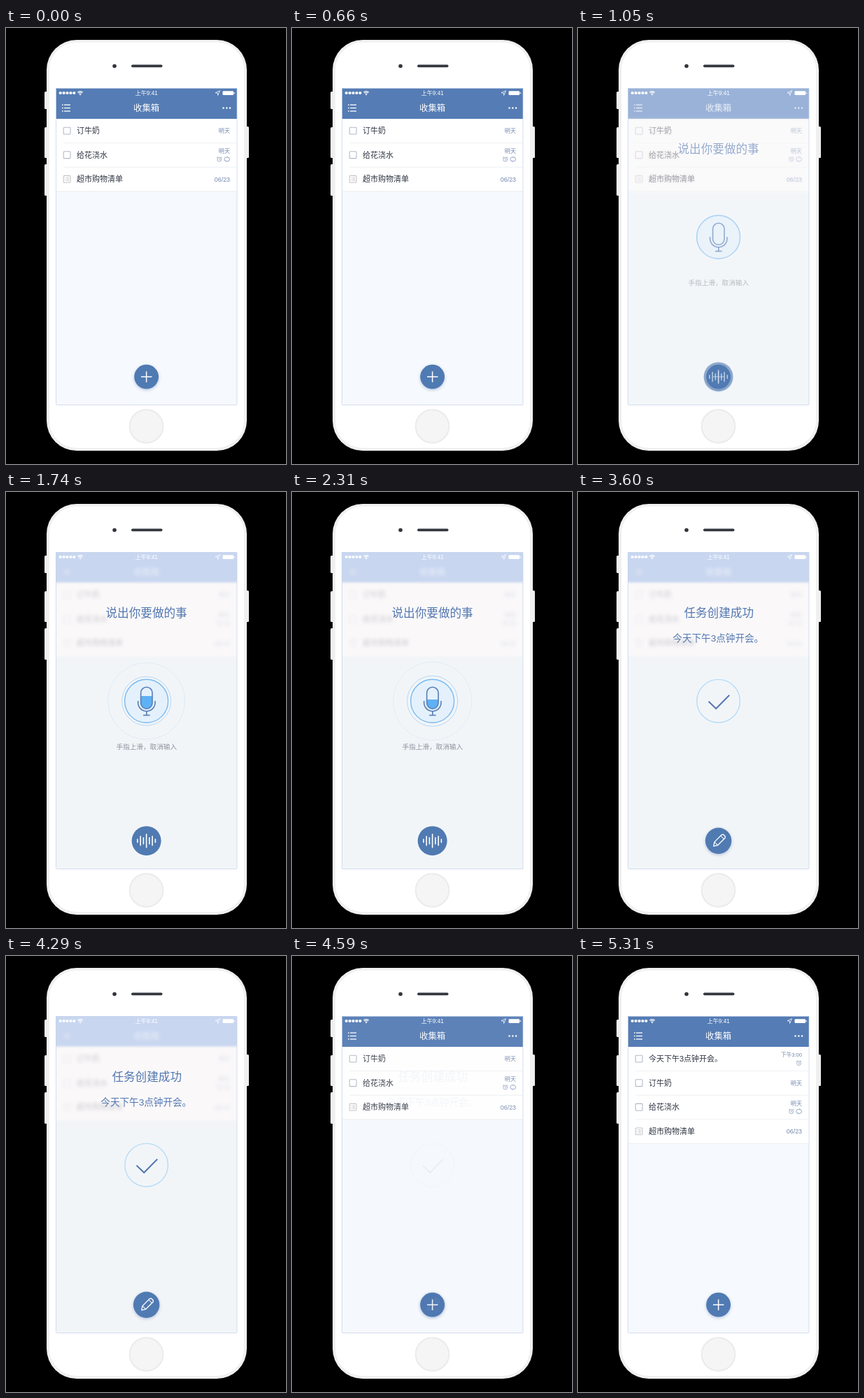
Animation of 400 by 624 pixels, one loop 5340 ms. Source, as an HTML page with a canvas:

```html
<!DOCTYPE html>
<html lang="zh-CN">
<head>
<meta charset="utf-8">
<title>语音任务</title>
<style>
html, body { margin: 0; width: 100%; height: 100%; overflow: hidden; background: #000; }
canvas { display: block; width: 400px; height: 624px; }
</style>
</head>
<body>
<canvas id="stage"></canvas>
<script>
const W = 400, H = 624, LOOP = 5340, STEP = 30, ROW = 34.6;
const FONT = '"Liberation Sans", "Noto Sans CJK SC", "Noto Sans CJK", sans-serif';
const BLUE = '#557cb4', INK = '#2f3442', DATE = '#7187ae', CX = 200.6;
const dpr = window.devicePixelRatio || 1;

function setup(canvas) {
  canvas.width = W * dpr;
  canvas.height = H * dpr;
  const c = canvas.getContext('2d');
  c.scale(dpr, dpr);
  return c;
}
const main = setup(document.getElementById('stage'));
let g = main;

const clamp = v => Math.max(0, Math.min(1, v));
const ramp = (t, a, b) => clamp((t - a) / (b - a));
const easeOut = p => 1 - Math.pow(1 - p, 3);
const mix = (a, b, p) => a + (b - a) * p;

function group(alpha, draw) {
  if (alpha <= 0) return;
  g.save();
  g.globalAlpha *= alpha;
  draw();
  g.restore();
}
function box(x, y, w, h, r, fill, stroke, lw = 1) {
  g.beginPath();
  g.roundRect(x, y, w, h, r);
  if (fill) { g.fillStyle = fill; g.fill(); }
  if (stroke) { g.strokeStyle = stroke; g.lineWidth = lw; g.stroke(); }
}
function disc(x, y, r, fill, stroke, lw = 1) {
  g.beginPath();
  g.arc(x, y, r, 0, Math.PI * 2);
  if (fill) { g.fillStyle = fill; g.fill(); }
  if (stroke) { g.strokeStyle = stroke; g.lineWidth = lw; g.stroke(); }
}
function line(points, color, lw) {
  g.beginPath();
  points.forEach(([x, y]) => g.lineTo(x, y));
  g.strokeStyle = color;
  g.lineWidth = lw;
  g.stroke();
}
function arc(x, y, r, a, b, color, lw) {
  g.beginPath();
  g.arc(x, y, r, a, b);
  g.strokeStyle = color;
  g.lineWidth = lw;
  g.stroke();
}
// y is the vertical middle of the line
function text(s, x, y, size, color, align = 'left', weight = 400) {
  g.font = `${weight} ${size}px ${FONT}`;
  g.textAlign = align;
  g.fillStyle = color;
  g.fillText(s, x, y + size * 0.37);
}

function phone() {
  g.fillStyle = '#000';
  g.fillRect(0, 0, W, H);
  [[91, 25], [142, 44], [195, 45]].forEach(([y, h]) => box(55, y, 6, h, 1.5, '#eee'));
  box(341, 141, 6, 45, 1.5, '#eee');
  box(58, 17, 286, 588, 43, '#f0f0f0');
  box(62, 20.5, 278, 580.5, 39, '#fff');
  disc(155, 54.5, 2.8, '#34363f');
  box(179, 52.6, 44.5, 3.6, 1.8, '#34363f');
  disc(200.5, 570, 23.8, '#f5f5f5', '#ebebeb', 2);
}

function status() {
  for (let i = 0; i < 5; i++) disc(77.7 + i * 4.9, 93, 2.1, '#fff');
  [1.8, 3.6, 5.4].forEach(r => arc(106, 96, r, -Math.PI * 0.75, -Math.PI * 0.25, '#fff', 1.1));
  disc(106, 95.6, 0.8, '#fff');
  text('上午9:41', CX, 93, 8.2, '#fff', 'center', 500);
  g.beginPath();
  [[305.5, 89.7], [299, 92.8], [302.3, 93.2], [302.6, 96.4]].forEach(p => g.lineTo(...p));
  g.closePath();
  g.strokeStyle = '#fff';
  g.lineWidth = 0.8;
  g.stroke();
  box(309.5, 90.2, 15.6, 5.8, 1.2, '#fff');
  box(325.6, 92, 1.2, 2.2, 0.5, '#fff');
}

function nav() {
  [110, 114.5, 119].forEach(y => {
    line([[80, y], [81.6, y]], '#fff', 1.3);
    line([[83, y], [92, y]], '#fff', 1.3);
  });
  text('收集箱', CX, 114.5, 12.4, '#fff', 'center');
  [310.5, 315.3, 320].forEach(x => disc(x, 114.6, 1.25, '#fff'));
}

function alarm(x, y) {
  disc(x, y + 0.3, 2.9, null, '#8b9cbd', 0.8);
  line([[x, y - 1.5], [x, y + 0.6], [x + 1.5, y + 0.6]], '#8b9cbd', 0.7);
  line([[x - 3.6, y - 2], [x - 2, y - 3.4]], '#8b9cbd', 0.9);
  line([[x + 3.6, y - 2], [x + 2, y - 3.4]], '#8b9cbd', 0.9);
}
function repeatIcon(x, y) {
  arc(x - 0.8, y, 3, Math.PI * 0.5, Math.PI * 1.6, '#8b9cbd', 0.9);
  arc(x + 0.8, y, 3, -Math.PI * 0.5, Math.PI * 0.6, '#8b9cbd', 0.9);
  line([[x - 1.2, y + 1.6], [x + 0.2, y + 3], [x - 1.2, y + 4.2]], '#8b9cbd', 0.7);
  line([[x + 1.2, y - 1.6], [x - 0.2, y - 3], [x + 1.2, y - 4.2]], '#8b9cbd', 0.7);
}

const MEETING = '今天下午3点钟开会。';
const FRESH = { title: MEETING, date: '下午3:00', size: 7.6, alarm: 315.5 };
const TASKS = [
  { title: '订牛奶', date: '明天', size: 8.1 },
  { title: '给花浇水', date: '明天', size: 8.1, alarm: 304.7, repeat: 315.7 },
  { title: '超市购物清单', date: '06/23', size: 8.9, list: true }
];

function task(item, y) {
  box(82.2, y - 5, 9.8, 9.8, 1, null, item.list ? '#c5c5ca' : '#b4b8c8', 1.1);
  if (item.list) [-2.2, 0, 2.2].forEach(d => {
    line([[84, y + d], [85, y + d]], '#bdbdc4', 0.8);
    line([[86, y + d], [90.2, y + d]], '#bdbdc4', 0.8);
  });
  text(item.title, 101, y, 11, INK);
  text(item.date, 320, item.alarm ? y - 5.8 : y, item.size, DATE, 'right');
  if (item.alarm) alarm(item.alarm, y + 6);
  if (item.repeat) repeatIcon(item.repeat, y + 6);
}

function tasks(insert) {
  const shift = insert * ROW;
  g.save();
  g.beginPath();
  g.rect(71.5, 130, 258.5, 410);
  g.clip();
  g.fillStyle = '#fff';
  g.fillRect(71.5, 130, 258.5, 103.8 + shift);
  for (let i = insert > 0 ? 0 : 1; i < 4; i++) {
    const y = 130 + i * ROW + shift;
    line([[i < 3 ? 82 : 72, y], [330, y]], '#e9ecf0', 0.8);
  }
  group(insert, () => task(FRESH, 147.2 - ROW + shift));
  TASKS.forEach((item, i) => task(item, 147.2 + i * ROW + shift));
  g.restore();
}

function inbox(insert) {
  box(71.5, 86.5, 258.5, 453, 1, '#f6f9fd');
  g.fillStyle = BLUE;
  g.fillRect(71.5, 86, 258.5, 44);
  nav();
  tasks(insert);
}

// Frosted backdrop of the voice screen, rendered once
function makeFrost() {
  const canvas = document.createElement('canvas');
  g = setup(canvas);
  g.beginPath();
  g.rect(71.5, 86, 258.5, 453.5);
  g.clip();
  g.fillStyle = '#f2f5f8';
  g.fillRect(71, 86, 260, 454);
  g.filter = `blur(${1.6 * dpr}px)`;
  g.fillStyle = '#faf8f9';
  g.fillRect(60, 126, 282, 109);
  g.fillStyle = '#c8d6f0';
  g.fillRect(60, 70, 282, 59.5);
  g.filter = `blur(${2.6 * dpr}px)`;
  group(0.45, () => {
    disc(87, 114.5, 5, '#e4e9f2');
    text('收集箱', CX, 114.5, 12.4, '#fff', 'center', 700);
  });
  group(0.24, () => TASKS.forEach((item, i) => task(item, 147.2 + i * ROW)));
  g = main;
  return canvas;
}

function button(r, shadow) {
  g.save();
  if (shadow) {
    g.shadowColor = 'rgba(70,105,165,0.35)';
    g.shadowBlur = 4 * dpr;
    g.shadowOffsetY = 1.5 * dpr;
  }
  disc(CX, 499.2, r, '#507ab2');
  g.restore();
}
function plusButton() {
  button(17.4, true);
  line([[193, 499.2], [208.4, 499.2]], '#fff', 1.5);
  line([[CX, 491.5], [CX, 507]], '#fff', 1.5);
}
function waveButton(r) {
  button(r, false);
  g.lineCap = 'round';
  [2.2, 6.5, 4.5, 9.5, 4.5, 6.5, 2.2].forEach((h, i) => {
    const x = CX + (i - 3) * 4.25;
    line([[x, 499.2 - h], [x, 499.2 + h]], '#fff', 1.6);
  });
  g.lineCap = 'butt';
}
function pencilButton(r) {
  button(r, true);
  g.save();
  g.translate(201.5, 499);
  g.rotate(-Math.PI / 4);
  g.lineJoin = 'round';
  g.beginPath();
  [[-11, 0], [-6, -3.3], [9, -3.3], [10.6, -1.8], [10.6, 1.8], [9, 3.3], [-6, 3.3]].forEach(p => g.lineTo(...p));
  g.closePath();
  g.strokeStyle = '#fff';
  g.lineWidth = 1.3;
  g.stroke();
  line([[-6, -3.3], [-6, 3.3]], '#fff', 1);
  line([[6.6, -3.3], [6.6, 3.3]], '#fff', 1);
  g.restore();
}

function rings(t) {
  const first = 1106, gap = 540, life = 830;
  for (let born = first; born < 2800; born += gap) {
    const age = t - born;
    if (age < 0 || age > life) continue;
    group(Math.min(1, 1.5 * (1 - age / life)), () =>
      disc(CX, 299.2, 31.5 + age * 20 / gap, null, '#b4d8f6', 1));
  }
}

function mic(t) {
  const wave = 294.5 - 4 * Math.cos((t - 1740) / 1140 * Math.PI * 2 + 0.9);
  const level = mix(311, wave, easeOut(ramp(t, 1100, 1500)));
  disc(CX, 299.2, 31, '#e4f1fc', '#79baf0', 1.4);
  g.save();
  g.beginPath();
  g.roundRect(192.6, 279.2, 16.4, 31, 8.2);
  g.clip();
  g.fillStyle = '#5fb1f5';
  g.fillRect(190, level, 22, 40);
  g.restore();
  box(192.6, 279.2, 16.4, 31, 8.2, null, '#587db3', 1.6);
  g.beginPath();
  g.moveTo(188.6, 299);
  g.lineTo(188.6, 301.5);
  g.arc(CX + 0.2, 301.5, 12.2, Math.PI, 0, true);
  g.lineTo(213, 299);
  g.strokeStyle = '#587db3';
  g.lineWidth = 1.6;
  g.stroke();
  line([[CX + 0.2, 313.7], [CX + 0.2, 319.5]], '#587db3', 1.6);
  line([[196, 319.5], [205.6, 319.5]], '#587db3', 1.6);
}

function tick(p) {
  disc(CX, 299.2, 30.8, null, '#b6dcf8', 1.4);
  if (p <= 0) return;
  const bend = 0.36, q = Math.min(1, p / bend), s = clamp((p - bend) / (1 - bend));
  const points = [[186.5, 299.8], [mix(186.5, 197.2, q), mix(299.8, 310, q)]];
  if (s > 0) points.push([mix(197.2, 216.2, s), mix(310, 290.8, s)]);
  line(points, '#5479b1', 2);
}

const frost = makeFrost();

function draw(t) {
  const insert = easeOut(ramp(t, 4620, 4860));
  const enter = ramp(t, 870, 1170), leave = ramp(t, 4350, 4607);
  const show = enter * (1 - leave);
  const done = ramp(t, 2850, 3060);

  phone();
  inbox(insert);
  group(show, () => g.drawImage(frost, 0, 0, W, H));
  box(71.5, 86.5, 258.5, 453, 1, null, 'rgba(196,210,233,0.7)', 1);
  status();
  if (show < 1) plusButton();
  if (show <= 0) return;

  group(show * (1 - done), () => {
    text('说出你要做的事', CX, 172.5, 16.6, '#5277b0', 'center');
    text('手指上滑，取消输入', 157.4, 364.4, 9.65, '#8d949e');
    rings(t);
    mic(t);
  });
  group(show * done, () => {
    text('任务创建成功', CX + 0.6, 172.5, 16.6, '#5277b0', 'center');
    text(MEETING, 135.3, 209, 13.6, '#5277b0');
    tick(easeOut(ramp(t, 2940, 3270)));
  });

  const r = mix(21, 18.7, done);
  group(show * (done < 1 ? 1 : 0), () => waveButton(r));
  group(show * done, () => pencilButton(r));
}

function frame(now) {
  draw(Math.floor((now % LOOP) / STEP) * STEP);
  requestAnimationFrame(frame);
}
requestAnimationFrame(frame);
</script>
</body>
</html>
```
